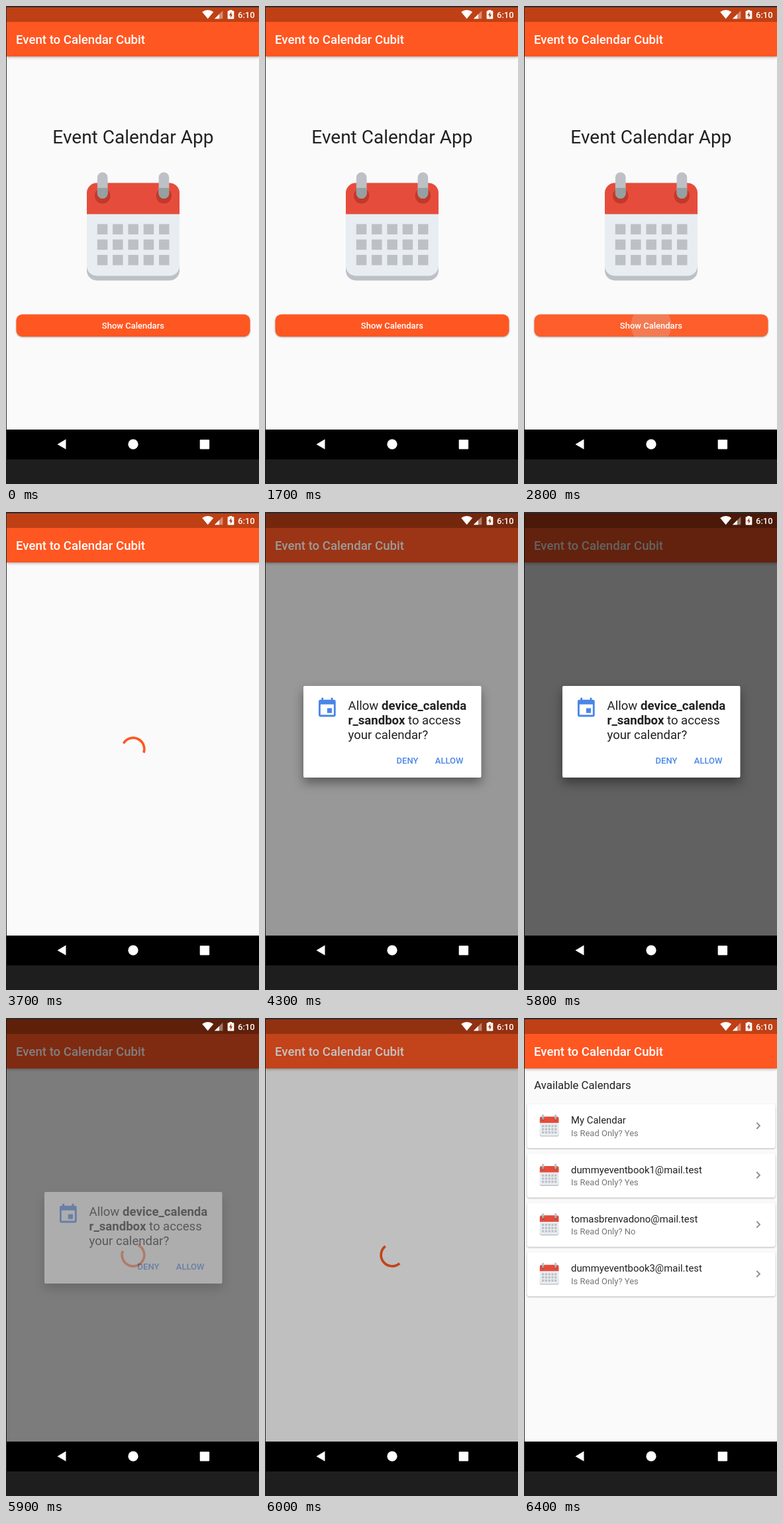
Write an HTML page that moves like this. It is 382x720 px and loops after 8 s.

```html
<!DOCTYPE html>
<html lang="en">
<head>
<meta charset="utf-8">
<title>Event to Calendar Cubit</title>
<style>
  html, body { margin: 0; width: 100%; height: 100%; overflow: hidden; background: #1e1e1e; }
  svg { display: block; width: 382px; height: 720px; font-family: Roboto, sans-serif; }
  .medium { font-weight: 500; }
  .card { fill: #fff; filter: drop-shadow(0 1px 1px rgba(0, 0, 0, .28)); }
  .bar { fill: #ff5722; filter: drop-shadow(0 1.5px 2px rgba(0, 0, 0, .35)); }
  .button { fill: #ff5722; filter: drop-shadow(0 1.5px 1.2px rgba(0, 0, 0, .32)); }
  .sheet { fill: #fff; filter: drop-shadow(0 8px 8px rgba(0, 0, 0, .4)); }
</style>
</head>
<body>
<svg viewBox="0 0 382 720">
  <defs>
    <clipPath id="body-clip"><path id="page" d="M0 0h140v131a15 15 0 0 1-15 15H15a15 15 0 0 1-15-15z"/></clipPath>
    <clipPath id="button-clip"><rect x="15.5" y="464.5" width="353" height="33.5" rx="9"/></clipPath>
    <g id="calendar">
      <path d="M0 110h140v38a15 15 0 0 1-15 15H15a15 15 0 0 1-15-15z" fill="#bdc0c5"/>
      <path d="M0 60h140v81a15 15 0 0 1-15 15H15a15 15 0 0 1-15-15z" fill="#e8edf1"/>
      <path d="M0 63V31a15 15 0 0 1 15-15h110a15 15 0 0 1 15 15v32z" fill="#e64c3c"/>
      <g id="rings"></g>
      <g id="days" fill="#bdc0c5"></g>
    </g>
  </defs>

  <rect width="382" height="720" fill="#1e1e1e"/>
  <rect width="382" height="683" fill="#2b2b30"/>
  <rect x="1" y="2" width="381" height="636" fill="#fafafa"/>

  <g id="home">
    <text x="191.9" y="207" font-size="28" text-anchor="middle" fill="#212121">Event Calendar App</text>
    <use href="#calendar" x="122" y="250.5"/>
    <rect class="button" x="15.5" y="464.5" width="353" height="33.5" rx="9"/>
    <g clip-path="url(#button-clip)" fill="#d0d0d0">
      <rect id="highlight" x="15" y="464" width="354" height="35"/>
      <circle id="splash" cx="192" cy="481" r="0"/>
    </g>
    <text class="medium" x="191.9" y="486.4" font-size="13" text-anchor="middle" fill="#fff">Show Calendars</text>
  </g>

  <path id="spinner" fill="none" stroke="#ff5722" stroke-width="3.7"/>

  <g id="list">
    <text x="15.3" y="107" font-size="16.74" fill="#212121">Available Calendars</text>
    <g id="rows"></g>
  </g>

  <rect class="bar" x="1" y="24" width="381" height="52"/>
  <rect x="1" y="2" width="381" height="22" fill="#bf4015"/>
  <text class="medium" x="15" y="57" font-size="18.65" fill="#fff">Event to Calendar Cubit</text>

  <rect id="dim" x="0" y="2" width="382" height="636"/>

  <g id="dialog">
    <rect class="sheet" x="58" y="262" width="268.5" height="138" rx="2"/>
    <path transform="translate(76.7 278.4) scale(1.43)" fill="#4a86e8" d="M17 12h-5v5h5zM16 1v2H8V1H6v2H5a2 2 0 0 0-2 2v14a2 2 0 0 0 2 2h14a2 2 0 0 0 2-2V5a2 2 0 0 0-2-2h-1V1zm3 18H5V8h14z"/>
    <g font-size="18.6" fill="#212121">
      <text x="125.6" y="298">Allow <tspan font-weight="700">device_calenda</tspan></text>
      <text x="125.6" y="320"><tspan font-weight="700">r_sandbox</tspan> to access</text>
      <text x="125.6" y="342">your calendar?</text>
    </g>
    <g class="medium" font-size="13" fill="#4a86e8">
      <text x="198.6" y="378.6">DENY</text>
      <text x="256.8" y="378.6">ALLOW</text>
    </g>
  </g>

  <g fill="#fff">
    <path d="M304.7 19.3L296.2 9a13.5 13.5 0 0 1 17 0z"/>
    <path d="M327.3 7v12.2h-12.4z" opacity=".4"/>
    <path d="M322 12.2v7h-7.1z"/>
    <path d="M337.3 7.2v-1.3h4v1.3h2.2q.8 0 .8.8v10.7q0 .8-.8.8h-8.1q-.8 0-.8-.8V8q0-.8.8-.8z"/>
    <path d="M340.2 8.8l-3.3 5.2h2v3.9l3.2-5.2h-1.9z" fill="#a8441f"/>
    <text class="medium" x="350" y="18" font-size="13">6:10</text>
  </g>

  <rect x="1" y="638" width="381" height="45"/>
  <g fill="#fff">
    <path d="M77.5 660.2l13-7.7v15.2z"/>
    <circle cx="192" cy="660.2" r="7.6"/>
    <rect x="292.7" y="653.2" width="14.4" height="14.2" rx="1"/>
  </g>
</svg>

<script>
const LOOP = 8000;
const PRESS = 2800, LOADING = 3050, LOADED = 6200;
const ASK = 4153, ANSWER = 5860, DIM_TIME = 230, DIM_MAX = 0.61;
const PAUSE_START = 4500, PAUSE = 1310;

const $ = id => document.getElementById(id);
const clamp = v => Math.min(1, Math.max(0, v));
const ramp = (t, start, length) => clamp((t - start) / length);
const show = (id, on) => $(id).setAttribute('display', on ? 'inline' : 'none');
const set = (id, attrs) => {
  for (const key in attrs) $(id).setAttribute(key, attrs[key]);
};

// Cubic bezier (.4, 0, .2, 1), solved by bisection
function fastOutSlowIn(x) {
  let low = 0, high = 1;
  for (let i = 0; i < 20; i++) {
    const m = (low + high) / 2, n = 1 - m;
    if (1.2 * n * n * m + 0.6 * n * m * m + m ** 3 < x) low = m; else high = m;
  }
  return low * low * (3 - 2 * low);
}

function buildCalendar() {
  $('rings').innerHTML = [23.7, 116.4].map(x => `
    <circle cx="${x}" cy="35.3" r="11.8" fill="#c03a2b"/>
    <rect x="${x - 7.8}" y="0" width="15.6" height="39.5" rx="7.8" fill="#bdc0c5"/>
    <path d="M${x - 7.8} 23.5h15.6v8.2a7.8 7.8 0 0 1-15.6 0z" fill="#95a0a0"/>`).join('');
  let days = '';
  for (let row = 0; row < 3; row++)
    for (let col = 0; col < 5; col++)
      days += `<rect x="${15.8 + col * 23.3}" y="${78 + row * 23.2}" width="15.5" height="15.5"/>`;
  $('days').innerHTML = days;
}

function buildList() {
  const calendars = [
    ['My Calendar', 'Yes'],
    ['dummyeventbook1@mail.test', 'Yes'],
    ['tomasbrenvadono@mail.test', 'No'],
    ['dummyeventbook3@mail.test', 'Yes'],
  ];
  $('rows').innerHTML = calendars.map(([name, readOnly], i) => `
    <g transform="translate(0 ${i * 74.4})">
      <rect class="card" x="4.5" y="129.5" width="375" height="66.5" rx="3.7"/>
      <use href="#calendar" transform="translate(23.8 145.2) scale(.205)"/>
      <text x="71" y="159.2" font-size="14.9" fill="#212121">${name}</text>
      <text x="71" y="177.6" font-size="13" fill="#757575">Is Read Only? ${readOnly}</text>
      <path d="M351.3 157.6l4.6 4.7-4.6 4.7" fill="none" stroke="#8c8c8c" stroke-width="1.9"/>
    </g>`).join('');
}

function drawSpinner(t) {
  const hidden = Math.min(PAUSE, Math.max(0, t - PAUSE_START));
  const turns = Math.max(0, t - LOADING - hidden) / 1000;
  const step = Math.floor(turns), phase = turns - step;
  const head = fastOutSlowIn(clamp(phase * 2));
  const tail = fastOutSlowIn(clamp(phase * 2 - 1));
  const start = Math.PI * (-0.5 + tail * 1.5 + phase * 1.7 - step * 0.8);
  const sweep = Math.max(0.001, (head - tail) * 1.5 * Math.PI);
  const r = 16.8;
  const point = a => `${192 + r * Math.cos(a)} ${357 + r * Math.sin(a)}`;
  set('spinner', { d: `M${point(start)}A${r} ${r} 0 ${sweep > Math.PI ? 1 : 0} 1 ${point(start + sweep)}` });
}

function render(t) {
  show('home', t < LOADING);
  show('spinner', t >= LOADING && t < LOADED);
  show('list', t >= LOADED);

  const press = ramp(t, PRESS - 50, 300);
  set('highlight', { opacity: 0.2 * clamp(press * 1.5) });
  set('splash', { r: 180 * press, opacity: press ? 0.25 : 0 });

  drawSpinner(t);

  const dim = ramp(t, ASK, DIM_TIME) - ramp(t, ANSWER, DIM_TIME);
  set('dim', { opacity: DIM_MAX * dim });

  const enter = ramp(t, ASK, 130), leave = ramp(t, ANSWER - 40, 130);
  const scale = 0.9 + 0.1 * fastOutSlowIn(enter);
  show('dialog', enter > 0 && leave < 1);
  set('dialog', {
    opacity: enter * (1 - leave),
    transform: `translate(192 331) scale(${scale}) translate(-192 -331)`,
  });
}

function frame() {
  render(performance.now() % LOOP);
  requestAnimationFrame(frame);
}

buildCalendar();
buildList();
frame();
</script>
</body>
</html>
```
